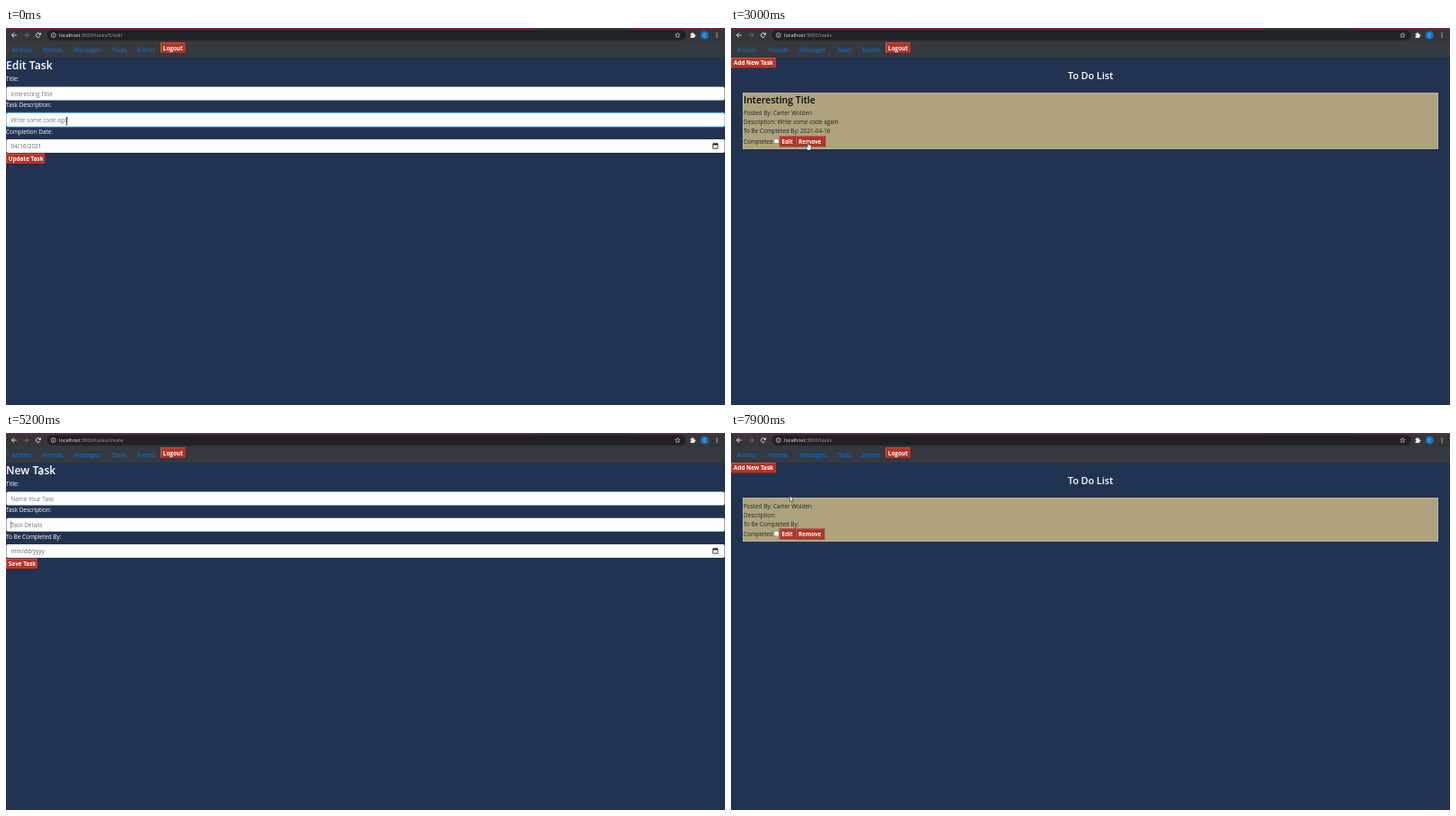
Recreate the animation shown at these times as an HTML page with a canvas. Size 800 by 420 pixels, loop 8000 ms.

```html
<!DOCTYPE html>
<html lang="en">
<head>
<meta charset="utf-8">
<title>Task list</title>
<style>
html, body { margin: 0; width: 100%; height: 100%; overflow: hidden; background: #223351; }
canvas { display: block; }
</style>
</head>
<body>
<canvas id="stage" width="800" height="420"></canvas>
<script>
const c = document.getElementById('stage').getContext('2d');
const LOOP = 8000, STEP = 100;
const USER = 'Carter Wolden';
const RED = '#b83226';

// Pointer path: time, x, y of the hot spot
const path = [
  [0, 67.5, 104], [900, 67.5, 104], [1400, 35, 146], [1800, 35, 146],
  [2000, 32.5, 146], [2200, 34, 145], [2700, 86, 127], [3100, 86, 127],
  [3500, 50, 126], [3800, 46, 133], [4400, 26, 39], [4900, 26, 39],
  [5200, 39, 42.5], [5700, 39, 42.5], [6300, 36, 128], [6800, 28.5, 146],
  [7200, 28.5, 146], [7900, 65.5, 70]
];

let mouse, buttons, textAreas;

function pointerAt(t) {
  const i = path.findIndex(p => p[0] > t);
  if (i < 0) return path[path.length - 1].slice(1);
  const [t0, x0, y0] = path[i - 1], [t1, x1, y1] = path[i];
  const u = (t - t0) / (t1 - t0), k = u * u * (3 - 2 * u);
  return [x0 + (x1 - x0) * k, y0 + (y1 - y0) * k];
}

const inside = ([x, y, w, h]) =>
  mouse[0] >= x && mouse[0] <= x + w && mouse[1] >= y && mouse[1] <= y + h;

function box(x, y, w, h, color, r = 0) {
  c.fillStyle = color;
  c.beginPath();
  c.roundRect(x, y, w, h, r);
  c.fill();
}

function disc(x, y, r, color) {
  box(x - r, y - r, 2 * r, 2 * r, color, r);
}

function text(s, x, y, color = '#fff', size = 6.4, weight = 400, align = 'left') {
  c.font = `${weight} ${size}px "Open Sans", "Noto Sans", sans-serif`;
  c.textAlign = align;
  c.fillStyle = color;
  c.fillText(s, x, y);
  return c.measureText(s).width;
}

function line(points, color, width = 1) {
  c.strokeStyle = color;
  c.lineWidth = width;
  c.beginPath();
  points.forEach(([x, y]) => c.lineTo(x, y));
  c.stroke();
}

function shape(points, fill, edge) {
  c.beginPath();
  points.forEach(([x, y]) => c.lineTo(x, y));
  c.closePath();
  c.fillStyle = fill;
  c.fill();
  if (edge) {
    c.strokeStyle = edge;
    c.lineWidth = 0.5;
    c.stroke();
  }
}

function button(label, x, y, w, h = 12) {
  const area = [x, y, w, h];
  buttons.push(area);
  if (inside(area)) w += 1;
  box(x, y, w, h, '#45201f');
  box(x, y, w - 0.8, h - 0.8, '#d0685c');
  box(x + 0.8, y + 0.8, w - 1.8, h - 1.8, RED);
  text(label, x + 2.8, y + h / 2 + 2.4, '#fff', 6.35, 700);
}

function arrow(x, dir, color) {
  line([[x - 2.7 * dir, 8], [x + 2.5 * dir, 8]], color, 0.9);
  line([[x, 5.3], [x + 2.7 * dir, 8], [x, 10.7]], color, 0.9);
}

function browser(url) {
  box(0, 0, 800, 16, '#35363a');
  box(0, 0, 800, 1.4, '#7b2137');
  box(592, 0, 102, 1.4, '#35363a');
  arrow(9, -1, '#eee');
  arrow(22.5, 1, '#75767a');

  c.strokeStyle = '#eee';
  c.lineWidth = 0.9;
  c.beginPath();
  c.arc(35.8, 8, 2.4, 0.5, 5.5);
  c.stroke();
  shape([[38.8, 4.9], [38.8, 7.7], [36, 7.7]], '#eee');

  box(45.5, 2.2, 711, 11.6, '#202124', 5.8);
  c.strokeStyle = '#d8d9db';
  c.lineWidth = 0.7;
  c.beginPath();
  c.arc(52.8, 8, 2.5, 0, 7);
  c.stroke();
  line([[52.8, 7.4], [52.8, 9.5]], '#d8d9db', 0.7);
  line([[52.8, 6.2], [52.8, 6.9]], '#d8d9db', 0.7);
  const w = text('localhost', 59, 10.2, '#f1f1f1', 5.6);
  text(':3000/' + url, 59 + w, 10.2, '#9aa0a6', 5.6);

  const star = [];
  for (let i = 0; i < 11; i++) {
    const a = i * Math.PI / 5 - Math.PI / 2, r = i % 2 ? 1.3 : 2.9;
    star.push([747.3 + r * Math.cos(a), 8.2 + r * Math.sin(a)]);
  }
  line(star, '#d8d9db', 0.6);

  box(761.5, 6.2, 4.6, 4.7, '#eee', 0.5);
  disc(763.8, 5.9, 1, '#eee');
  disc(766.4, 8.5, 1, '#eee');
  disc(761.7, 8.6, 0.8, '#35363a');
  disc(777.2, 8, 4.6, '#1673c4');
  text(USER[0], 777.2, 9.8, '#dce9f5', 4.8, 400, 'center');
  for (const y of [5.8, 8, 10.2]) disc(791, y, 0.65, '#eee');
}

function navbar() {
  box(0, 16, 800, 16.7, '#343a40');
  [['Articles', 6.5], ['Friends', 41.2], ['Messages', 76], ['Tasks', 118], ['Events', 146]]
    .forEach(([s, x]) => text(s, x, 26.8, '#0a76ee'));
  button('Logout', 172, 16.2, 28.3);
}

function field(label, y, value, color, ring, caret) {
  text(label, 0, y - 6.2);
  if (ring) {
    c.globalAlpha = ring;
    box(0, y - 1.2, 800, 17.9, '#1b528f', 2);
    box(0, y - 0.4, 800, 16.3, '#3f8fe6', 2);
    c.globalAlpha = 1;
  }
  box(0.4, y + 0.3, 799.2, 14.9, '#fff', 1.7);
  const w = text(value, 5.5, y + 10.6, color);
  if (caret) {
    const x = 5.6 + (caret === 'end' ? w : 0);
    line([[x, y + 4], [x, y + 12]], '#333', 0.6);
  }
  textAreas.push([0, y, 780, 15.5]);
}

function form(f) {
  text(f.title, 0, 45.6, '#fff', 12.2, 600);
  textAreas.push([0, 36, 56, 12]);
  field('Title:', 65.3, f.name, '#6c757d');
  field('Task Description:', 94.5, f.details, '#6c757d', f.ring, f.caret);
  field(f.dateLabel, 123.7, f.date, '#5b636b');
  box(786.3, 128.5, 6, 5.9, '#111', 0.5);
  box(787, 130.4, 4.6, 3.3, '#fff');
  box(787.3, 127.8, 0.8, 1, '#111');
  box(790.5, 127.8, 0.8, 1, '#111');
  button(f.save, 0, 139.8, f.width);
}

function list(item) {
  button('Add New Task', 0.2, 33, 50.3);
  text('To Do List', 400, 56.6, '#fff', 10.8, 600, 'center');
  if (!item) return;
  const dy = item.title ? 0 : -13.9, ink = '#212529';
  box(13, 72, 774, 63 + dy, '#c9c3a8');
  box(13.5, 72.5, 773, 62 + dy, '#aea37c');
  text(item.title, 14, 84.2, '#080808', 10.5, 600);
  text('Posted By: ' + USER, 14, 97.4 + dy, ink);
  text('Description: ' + item.details, 14, 107.4 + dy, ink);
  text('To Be Completed By: ' + item.date, 14, 117.4 + dy, ink);
  text('Completed', 14, 128.6 + dy, ink);
  box(48, 123.3 + dy, 5.4, 5.4, '#6f6b58', 1);
  box(48.4, 123.7 + dy, 4.6, 4.6, '#fff', 0.7);
  button('Edit', 53.7, 120.3 + dy, 18.5);
  button('Remove', 72.2, 120.3 + dy, 32);
}

function pointer() {
  const at = points => points.map(([x, y]) => [x + mouse[0], y + mouse[1]]);
  if (buttons.some(inside)) {
    shape(at([[-0.7, 0], [0.5, 0], [0.6, 3], [3.4, 3.9], [3.4, 6.3], [2.5, 9],
      [-1, 9], [-2.9, 5.7], [-2.2, 5], [-0.8, 6]]), '#fff', '#111');
  } else if (textAreas.some(inside)) {
    const color = mouse[1] > 60 ? '#222' : '#d5d9e0';
    line(at([[0, -3.6], [0, 3.8]]), color, 0.7);
    line(at([[-1.3, -3.8], [1.3, -3.8]]), color, 0.6);
    line(at([[-1.3, 4], [1.3, 4]]), color, 0.6);
  } else {
    shape(at([[0, 0], [0, 6.3], [1.4, 5.1], [2.4, 7.3], [3.4, 6.8], [2.5, 4.7], [4.3, 4.6]]),
      '#fff', '#111');
  }
}

const blink = (t, start) => (t - start) % 1000 < 500;

function editPage(t) {
  const typing = t < 600, focused = t < 1700;
  browser('tasks/5/edit');
  form({
    title: 'Edit Task', name: 'Interesting Title',
    details: 'Write some code ' + 'again'.slice(0, t < 200 ? 3 : typing ? 4 : 5),
    dateLabel: 'Completion Date:', date: '04/16/2021', save: 'Update Task', width: 44,
    ring: focused ? 1 : 0,
    caret: focused && (typing || blink(t, 600)) && 'end'
  });
}

function createPage(t) {
  const focused = t >= 5200 && t < 7100;
  browser('tasks/create');
  form({
    title: 'New Task', name: 'Name Your Task', details: 'Task Details',
    dateLabel: 'To Be Completed By:', date: 'mm/dd/yyyy', save: 'Save Task', width: 35.7,
    ring: focused ? Math.min(1, (t - 5200) / 150) : 0,
    caret: focused && blink(t, 5200) && 'start'
  });
}

function listPage(item) {
  browser('tasks');
  list(item);
}

function draw(t) {
  mouse = pointerAt(t);
  buttons = [];
  textAreas = [];
  box(0, 0, 800, 420, '#223351');
  if (t < 1900) editPage(t);
  else if (t < 3100) listPage({ title: 'Interesting Title', details: 'Write some code again', date: '2021-04-16' });
  else if (t < 4800) listPage();
  else if (t < 7200) createPage(t);
  else listPage({ title: '', details: '', date: '' });
  navbar();
  pointer();
}

const start = performance.now();
function tick() {
  const t = (performance.now() - start) % LOOP;
  draw(Math.floor(t / STEP) * STEP);
  requestAnimationFrame(tick);
}
tick();
</script>
</body>
</html>
```
